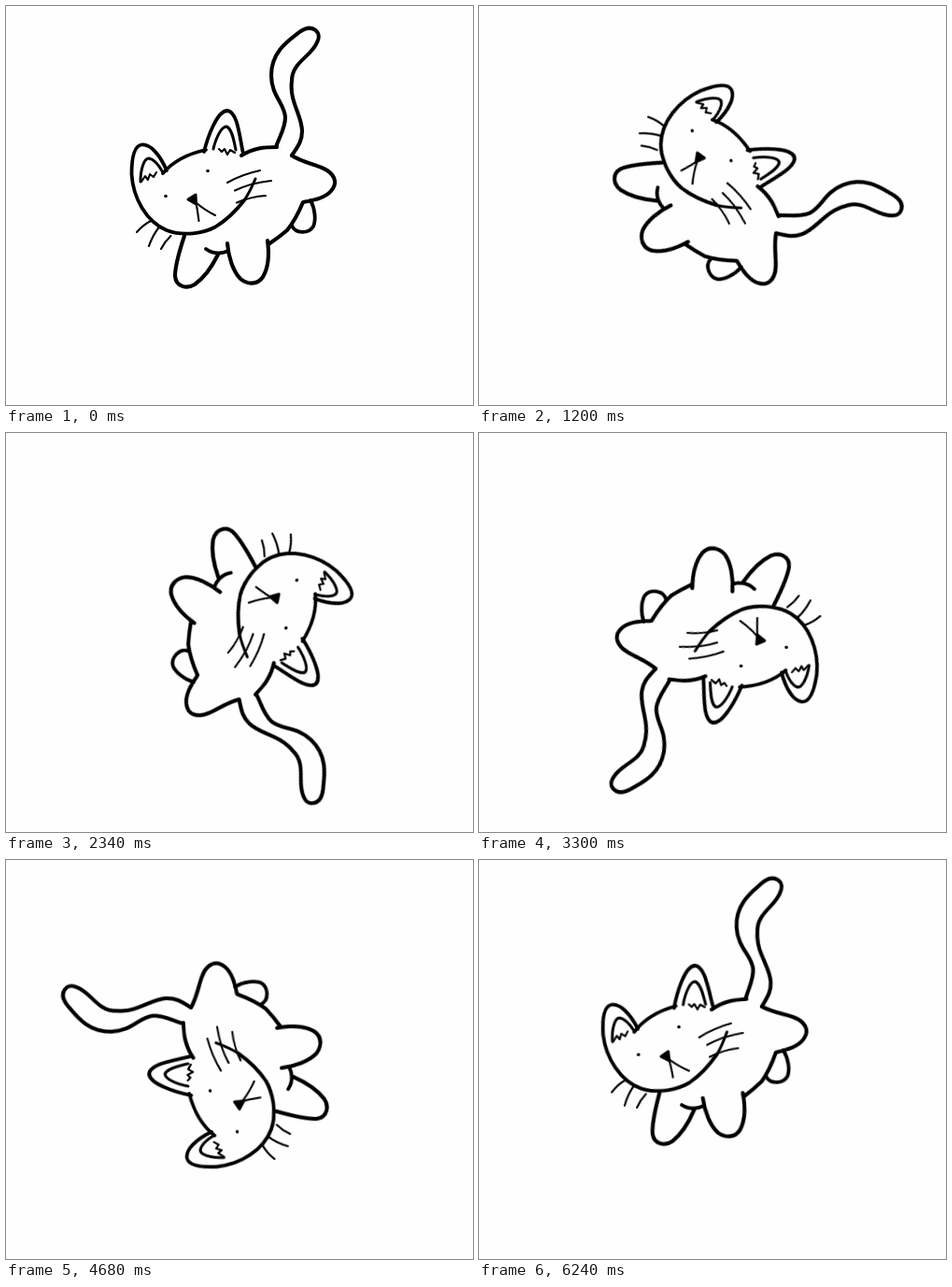
Recreate the animation shown at these times as an HTML page. Size 500 by 427 pixels, loop 6.36 s.

```html
<!DOCTYPE html>
<html lang="en">
<head>
<meta charset="utf-8">
<title>Spinning cat</title>
<style>
  html, body { margin: 0; width: 100%; height: 100%; overflow: hidden; background: #fefefe; }
  svg { display: block; width: 500px; height: 427px; }
  .cat {
    fill: none; stroke: #000; stroke-linecap: round; stroke-linejoin: round;
    transform-origin: 251px 210.5px;
    animation: spin 6360ms -2ms infinite;
  }
  .body { stroke-width: 4.1; }
  .head { stroke-width: 3.8; }
  .ear { stroke-width: 3; }
  .fine { stroke-width: 2.1; }
  .nose { fill: #000; stroke-width: 3; }
  .eye { fill: #000; stroke: none; }
  /* 105 poses of 60 ms each; the last one is held twice as long */
  @keyframes spin {
    0% { transform: rotate(0deg); animation-timing-function: steps(104, end); }
    98.113208%, 100% { transform: rotate(356.5714deg); }
  }
</style>
</head>
<body>
<svg viewBox="0 0 500 427">
  <g class="cat">
    <g class="body">
      <!-- tail -->
      <path d="M289 151C293 139 299 131 299 119C298 104 284 96 284 74C284 48 304 36 314 28C328 18 339 28 333 39C327 54 306 60 306 80C303 102 317 117 317 134C317 146 311 152 306 160"/>
      <!-- back and haunch -->
      <path d="M252 160C265 152 276 151 290 151"/>
      <path d="M306 160C318 168 335 170 344 176C354 183 354 191 348 198C341 206 328 208 318 210C313 222 309 230 301 240C294 246 287 251 281 255"/>
      <!-- hind foot -->
      <path class="head" d="M326 208C331 217 332 229 329 236C324 244 310 244 306 235"/>
      <!-- front legs and belly -->
      <path d="M280 251C282 266 281 280 275 290C269 299 258 298 251 292C243 284 238 268 237 254"/>
      <path class="head" d="M214 260C221 265 229 266 238 262"/>
      <path d="M191 246C186 261 181 278 181 289C182 301 194 303 202 298C212 291 221 278 227 266"/>
    </g>
    <g class="head">
      <path d="M172 176C165 159 154 147 145 148.5C136 150 134.5 166 134.5 180C136 205 150 231 172 240C190 247 212 243 224 236.5C238 228 248 217 255 208"/>
      <path d="M168 179C180 165 195 158 214 154"/>
      <path d="M212 156C216 140 226 112 237 112C248 113 250 140 254 158"/>
      <path class="ear" d="M255 208C260 201 264 192 267 185"/>
    </g>
    <g class="ear">
      <path d="M144 188C144 174 148 163 153 163C159 164 164 171 168 178"/>
      <path d="M222 153C225 140 231 129 236 129C242 131 244 144 246 154"/>
    </g>
    <g class="fine">
      <path d="M145 188L149 182L152 186L154 180L158 183L161 178"/>
      <path d="M228 153L231 156L234 153L237 159L240 154L245 157"/>
      <!-- whiskers -->
      <path d="M155 230Q147 234 140 242M164.5 236Q157 245 153 257M176.5 246Q170 252 166 260"/>
      <path d="M237 189Q253 180 272 176M245 197.5Q263 189 284 187M247 210.5Q262 204 278 203"/>
      <!-- mouth -->
      <path d="M203 208Q205 218 206.5 230M203 210Q212 218 224 224"/>
    </g>
    <path class="nose" d="M195 207L203 202L203.5 212Z"/>
    <circle class="eye" cx="171" cy="203.5" r="1.8"/>
    <circle class="eye" cx="216" cy="176.5" r="1.8"/>
  </g>
</svg>
</body>
</html>
```
